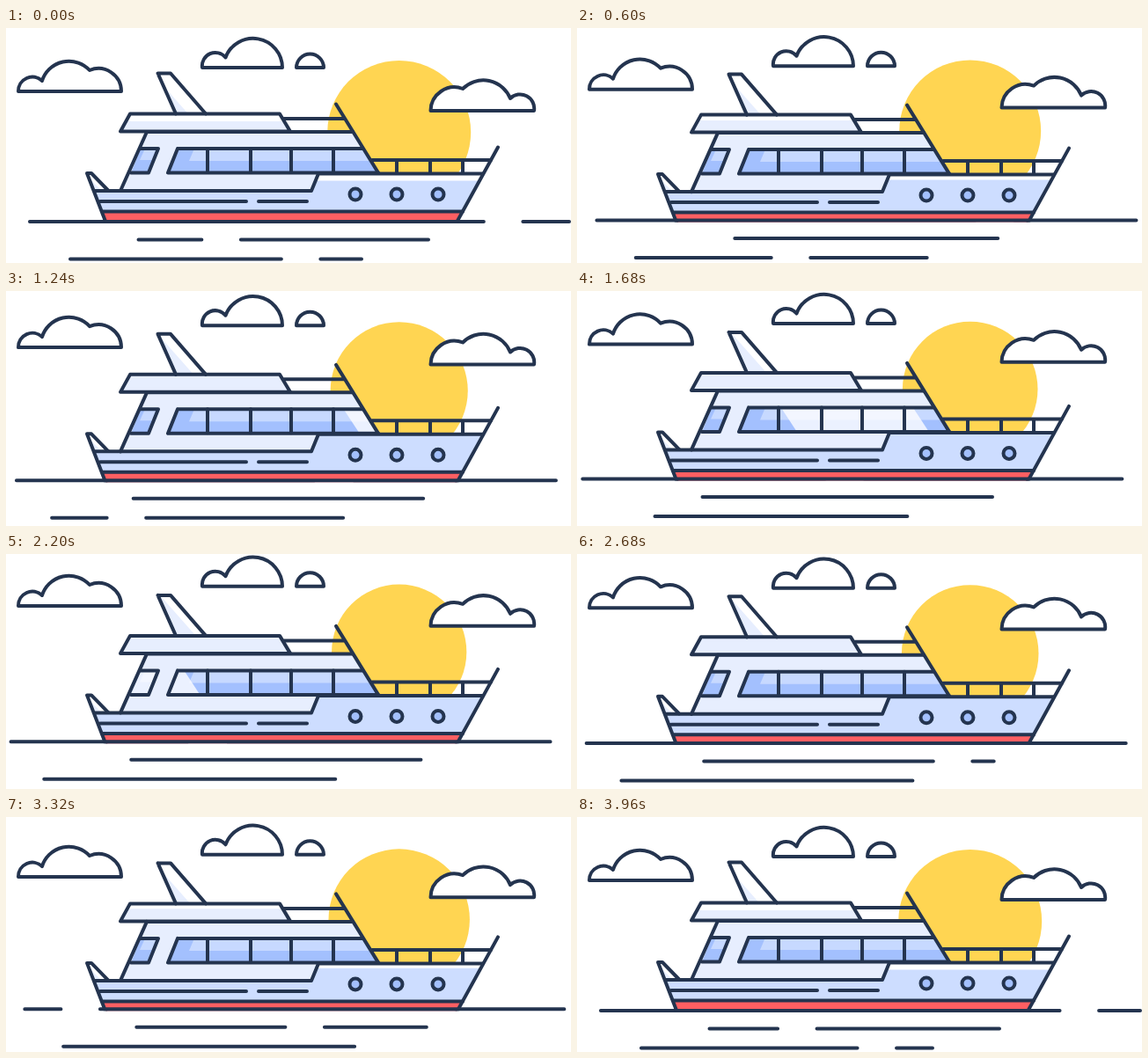
An HTML page for the animation above (4000 ms loop, 642x267 px).

```html
<!DOCTYPE html>
<html lang="en">
<head>
<meta charset="utf-8">
<title>Yacht at sea</title>
<style>
html, body { margin: 0; width: 100%; height: 100%; overflow: hidden; background: #fff; }
svg { display: block; width: 100%; height: 100%; }
.ink { stroke: #24344f; stroke-width: 4; stroke-linecap: round; stroke-linejoin: round; }
.line { fill: none; }
.white { fill: #fff; }
.pale { fill: #e7eefe; }
.hull { fill: #cdddff; }
.glass { fill: #a3c0fe; }
.red { fill: #ff5f62; }
</style>
</head>
<body>
<svg viewBox="0 0 642 267">
  <defs>
    <clipPath id="above"><rect id="dry" width="642" height="222"/></clipPath>
    <clipPath id="roofClip"><path d="M141 97.5H311L323 117.5H130Z"/></clipPath>
    <clipPath id="finClip"><path d="M172.500 51.500H187L227 97.500H193Z"/></clipPath>
    <clipPath id="bowClip"><path d="M347 185L355 165.500H543L513 219H347Z"/></clipPath>
    <clipPath id="panes"><path d="M195 137H406L423 164.500H184ZM153 137H173L162 164.500H142Z"/></clipPath>
  </defs>

  <circle id="sun" cx="446.700" fill="#ffd552"/>

  <g class="ink white">
    <path id="cloudA" d="M14 72A16 16 0 0 1 41 60A32 32 0 0 1 95 48A26 26 0 0 1 131 72Z"/>
    <path id="cloudB" d="M223 45A15 15 0 0 1 249.500 33.500A33.300 33.300 0 0 1 314 45ZM330 45A15.500 15.500 0 0 1 361 45Z"/>
    <path id="cloudC" d="M482.500 94A27 27 0 0 1 519 69A33 33 0 0 1 573 80A16 16 0 0 1 600 94Z"/>
  </g>

  <path id="sea" class="ink line"/>

  <g clip-path="url(#above)">
    <g id="ship">
      <path class="white" d="M92 165H97L116 185H101Z"/>
      <path class="pale" d="M94 170L109 185H100Z"/>
      <path class="hull" d="M101 185H347L355 166H542L507 230H117Z"/>
      <g clip-path="url(#bowClip)">
        <path class="white" d="M340 160H560V190H340Z"/>
        <path class="hull shade" d="M330 173.500H560V230H330Z"/>
      </g>
      <path class="red" d="M109 208.500H519L507 230H117Z"/>

      <path class="pale" d="M160 118H394L423 165.500H355L347 185H130Z"/>
      <g clip-path="url(#panes)">
        <path class="glass" d="M130 130H430V170H130Z"/>
        <path fill="#c7d9ff" d="M214 137H406L415 151H208ZM158 137H173L167 150H152Z"/>
        <path id="glare" fill="#fff" fill-opacity=".78" d="M0 137H150L168 164.500H18Z"/>
      </g>

      <path class="white" d="M141 97.500H311L323 117.500H130Z"/>
      <g clip-path="url(#roofClip)">
        <path class="pale shade" d="M120 106H330V140H120Z"/>
      </g>
      <path class="white" d="M172.500 51.500H187L227 97.500H193Z"/>
      <g clip-path="url(#finClip)">
        <path class="pale shade" d="M165 50L219 111H165Z"/>
      </g>

      <g class="ink line">
        <path d="M172.500 51.500H187L227 97.500M172.500 51.500L193 97.500"/>
        <path d="M141 97.500H311L323 117.500H130Z"/>
        <path d="M316 103H385M375 86.500L423 164.500"/>
        <path d="M160 118H394M160 118L130 185"/>
        <path d="M195 137H405M195 137L184 164.500H423M153 137H173L162 164.500H142"/>
        <path d="M229 137V164M278 137V164M324 137V164M372 137V164"/>
        <path d="M416 150H551M444 150V165M482 150V165M519 150V165"/>
        <path d="M101 185H347L355 165.500H542"/>
        <path d="M116 184.500L97 165H92L117 230M559 135.500L507 230"/>
        <path d="M107 197H273M287 197H342M109 208.500H519"/>
      </g>
      <g class="ink glass">
        <circle cx="397" cy="189" r="6.500"/>
        <circle cx="444" cy="189" r="6.500"/>
        <circle cx="491" cy="189" r="6.500"/>
      </g>
    </g>
  </g>
  <path id="keel" class="ink line" d="M113.500 220H512.500"/>
</svg>

<script>
const LOOP = 4000, GAP = 44.500, SPEED = 0.143;
const $ = id => document.getElementById(id);
const shades = document.querySelectorAll('.shade');
const ease = p => (1 - Math.cos(Math.PI * p)) / 2;

// Eased value through [time, value] keys
function track(keys, t) {
  let i = 1;
  while (i < keys.length - 1 && t > keys[i][0]) i++;
  const [t0, a] = keys[i - 1], [t1, b] = keys[i];
  return a + (b - a) * ease((t - t0) / (t1 - t0));
}

const swing = (peak, value, t) => track([[0, 0], [peak, value], [LOOP, 0]], t);
const move = (el, x, y) => el.setAttribute('transform', `translate(${x.toFixed(2)} ${y.toFixed(2)})`);

const bob = [[0, 0], [500, 1.2], [1720, -4.6], [2280, -4.6], [3500, 1.2], [LOOP, 0]];

// left, right, height, sideways drift, first gap position
const waves = [
  [27, 640, 220, -22, 516],
  [150.500, 480, 240.500, -8.500, 72],
  [73, 404, 262.500, -30.500, 240]
];

function wave([x1, x2, y, drift, start], k, lift, t) {
  const span = LOOP * SPEED, dx = drift * k;
  let g = start - SPEED * t;
  if (g < -GAP) g += span;
  const a = x1 + dx, b = x2 + dx, h = y + lift;
  let d = '';
  if (g >= 0) d += `M${a} ${h}H${Math.min(a + g, b)}`;
  const from = Math.max(a, a + g + GAP);
  if (from <= b) d += `M${from} ${h}H${b}`;
  return d;
}

function draw(t) {
  const k = swing(2000, 1, t), lift = -6.8 * k;

  $('sun').setAttribute('cy', 118.500 - 7.500 * k);
  $('sun').setAttribute('r', 81.500 - 5 * k);

  move($('cloudA'), 0, swing(2180, -13, t));
  move($('cloudB'), 0, swing(2000, -8.500, t));
  move($('cloudC'), 0, swing(1780, -13.300, t));

  move($('ship'), 0, track(bob, t));
  move($('dry'), 0, lift);
  move($('keel'), 0, lift);
  shades.forEach(s => move(s, 0, -10 * k));
  move($('glare'), 384 - 0.345 * (t - 1240), 0);

  $('sea').setAttribute('d', waves.map(w => wave(w, k, lift, t)).join(''));
}

const begin = performance.now();
function tick() {
  draw((performance.now() - begin) % LOOP);
  requestAnimationFrame(tick);
}
tick();
</script>
</body>
</html>
```
